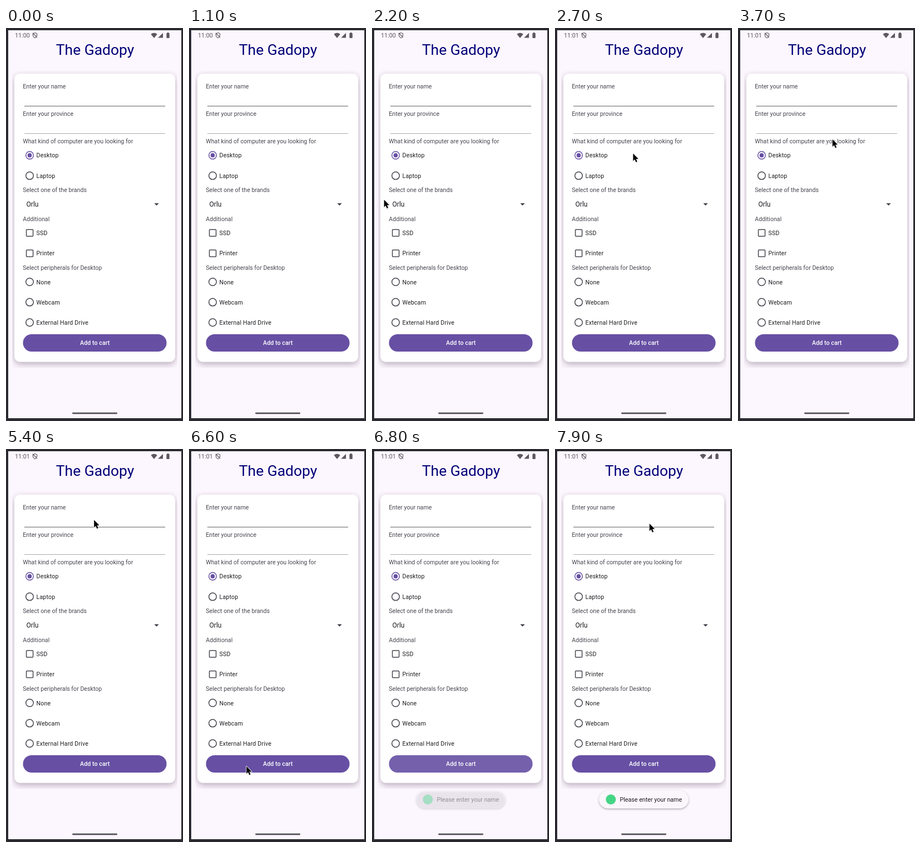
Write an HTML page with a canvas that moves like this. It is 318 px wide and 702 px high and loops after 8000 ms.

```html
<!DOCTYPE html>
<html lang="en">
<head>
<meta charset="utf-8">
<title>Computer order form</title>
<style>
html, body { margin: 0; width: 100%; height: 100%; overflow: hidden; background: #2b2a30; }
canvas { display: block; width: 318px; height: 702px; }
</style>
</head>
<body>
<canvas id="stage"></canvas>
<script>
const W = 318, H = 702, LOOP = 8000, STEP = 100;
const PAGE = '#fcf6fe', INK = '#1d1b20', LABEL = '#49454f', PURPLE = '#6750a4';
const canvas = document.getElementById('stage');
const ctx = canvas.getContext('2d');
const dpr = window.devicePixelRatio || 1;
canvas.width = W * dpr;
canvas.height = H * dpr;

// Pointer strokes: each is a run of [ms, x, y].
const strokes = [
  [[1600, 21, 306], [2200, 21, 306], [2900, 169, 203], [3200, 169, 203],
   [3400, 169, 198], [4300, 169, 198], [4600, 168, 161], [4700, 168, 161],
   [5100, 161, 118], [5400, 157.5, 126], [5700, 157.5, 126],
   [6300, 100, 560], [6400, 102.5, 566], [6600, 102.5, 566], [6700, 272, 257]],
  [[7600, 291, 251], [7900, 169, 132.5]]
];

const clamp = v => Math.min(1, Math.max(0, v));
const ease = v => v * v * (3 - 2 * v);

function pointerAt(t) {
  const run = strokes.find(s => t >= s[0][0] && t < s[s.length - 1][0] + STEP);
  if (!run) return null;
  let i = 0;
  while (i < run.length - 2 && t >= run[i + 1][0]) i++;
  const [t0, x0, y0] = run[i], [t1, x1, y1] = run[i + 1];
  const k = ease(clamp((t - t0) / (t1 - t0)));
  return [x0 + (x1 - x0) * k, y0 + (y1 - y0) * k];
}

function text(str, x, y, { size = 10.6, color = INK, weight = 400, gap = 0, align = 'left' } = {}) {
  ctx.font = `${weight} ${size}px Roboto, sans-serif`;
  ctx.letterSpacing = gap + 'px';
  ctx.textAlign = align;
  ctx.fillStyle = color;
  ctx.fillText(str, x, y);
}

function box(x, y, w, h, r, color) {
  ctx.beginPath();
  ctx.roundRect(x, y, w, h, r);
  ctx.fillStyle = color;
  ctx.fill();
}

function poly(points, color) {
  ctx.beginPath();
  points.forEach(([x, y]) => ctx.lineTo(x, y));
  ctx.closePath();
  ctx.fillStyle = color;
  ctx.fill();
}

function disc(x, y, r, color) {
  ctx.beginPath();
  ctx.arc(x, y, r, 0, Math.PI * 2);
  ctx.fillStyle = color;
  ctx.fill();
}

function shadow(color, blur, dy) {
  ctx.shadowColor = color;
  ctx.shadowBlur = blur * dpr;
  ctx.shadowOffsetY = dy * dpr;
}

function radio(label, y, on) {
  ctx.beginPath();
  ctx.arc(42.5, y, 6.8, 0, Math.PI * 2);
  ctx.strokeStyle = on ? PURPLE : LABEL;
  ctx.lineWidth = 1.5;
  ctx.stroke();
  if (on) disc(42.5, y, 3.8, PURPLE);
  text(label, 54.5, y + 4, { gap: 0.19 });
}

function checkbox(label, y) {
  ctx.beginPath();
  ctx.roundRect(36.6, y - 6, 12, 12, 1);
  ctx.strokeStyle = LABEL;
  ctx.lineWidth = 1.5;
  ctx.stroke();
  text(label, 54.5, y + 4, { gap: 0.19 });
}

function statusBar(t) {
  const grey = '#5b585f';
  text(t < 2500 ? '11:00' : '11:01', 16, 17, { size: 10.8, color: grey });

  ctx.strokeStyle = grey;
  ctx.lineWidth = 1.1;
  ctx.beginPath();
  ctx.moveTo(52, 8.5);
  ctx.lineTo(55.6, 10);
  ctx.lineTo(55.6, 13);
  ctx.quadraticCurveTo(55.2, 16.3, 52, 17.7);
  ctx.quadraticCurveTo(48.8, 16.3, 48.4, 13);
  ctx.lineTo(48.4, 10);
  ctx.closePath();
  ctx.moveTo(48, 9);
  ctx.lineTo(56, 17);
  ctx.stroke();

  ctx.beginPath();
  ctx.moveTo(266, 18);
  ctx.lineTo(260.3, 11);
  ctx.quadraticCurveTo(266, 6.4, 271.7, 11);
  ctx.closePath();
  ctx.fillStyle = grey;
  ctx.fill();
  poly([[273.2, 17.5], [282, 17.5], [282, 8.7]], grey);
  box(288.3, 9, 5.4, 9, 1, grey);
  box(289.8, 8, 2.4, 2, 0, grey);
}

function card() {
  ctx.save();
  ctx.beginPath();
  ctx.rect(11, 76, 297, 531);
  ctx.clip();
  shadow('rgba(60,35,60,.34)', 12, 4);
  box(15, 81.5, 289, 515, 10, '#fff');
  ctx.restore();
}

function button(t) {
  ctx.save();
  box(30.5, 547, 258, 31, 15.5, PURPLE);
  if (t >= 6700 && t < 7200) {
    ctx.clip();
    const grow = clamp((t - 6600) / 200);
    const fade = 1 - clamp((t - 6800) / 400);
    disc(102.5 + 57 * grow, 563, 150 * grow, `rgba(255,255,255,${0.09 * fade})`);
  }
  ctx.restore();
  text('Add to cart', 159.7, 566.4, { color: '#fff', weight: 500, gap: 0.08, align: 'center' });
}

function toast(t) {
  const alpha = clamp((t - 6700) / 240);
  if (!alpha) return;
  ctx.save();
  ctx.globalAlpha = alpha;
  ctx.save();
  shadow('rgba(40,30,50,.36)', 3.5, 1.5);
  box(79, 610, 161, 32, 16, '#fbf6fc');
  ctx.restore();
  disc(100.3, 626, 9, '#45d586');
  text('Please enter your name', 116.5, 630, { size: 10.7 });
  ctx.restore();
}

function pointer(t) {
  const p = pointerAt(t);
  if (!p) return;
  ctx.save();
  ctx.translate(p[0] + 0.7, p[1] + 0.8);
  const arrow = [[0, 0], [0, 13.2], [3, 10.5], [5.1, 15.5], [7.4, 14.5], [5.3, 9.7], [9.4, 9.5]];
  shadow('rgba(0,0,0,.3)', 2, 1);
  poly(arrow, '#fff');
  ctx.shadowColor = 'transparent';
  ctx.strokeStyle = '#fff';
  ctx.lineWidth = 1.7;
  ctx.lineJoin = 'round';
  ctx.stroke();
  poly(arrow, '#000');
  ctx.restore();
}

function draw(t) {
  ctx.setTransform(dpr, 0, 0, dpr, 0, 0);
  box(0, 0, W, H, 0, '#2b2a30');
  box(4, 4, 311, 693, 0, PAGE);
  statusBar(t);
  text('The Gadopy', 160, 47.6, { size: 26.4, color: '#000077', align: 'center' });
  card();

  const label = (str, y) => text(str, 30.3, y, { color: LABEL, size: 10.65 });
  label('Enter your name', 108.3);
  box(33, 139, 253, 1, 0, '#626066');
  label('Enter your province', 157);
  box(33, 188, 253, 1, 0, '#aaa8ad');
  label('What kind of computer are you looking for', 205.8);
  radio('Desktop', 227.4, true);
  radio('Laptop', 263.8);
  label('Select one of the brands', 293.3);
  text('Orlu', 36.5, 319.3, { size: 12.1 });
  poly([[266.3, 313], [274.7, 313], [270.5, 317.3]], LABEL);
  label('Additional', 344.6);
  checkbox('SSD', 366);
  checkbox('Printer', 402.4);
  label('Select peripherals for Desktop', 432);
  radio('None', 453.5);
  radio('Webcam', 489.8);
  radio('External Hard Drive', 526);

  button(t);
  toast(t);
  box(119, 686.8, 81, 2.6, 1.3, '#545158');
  pointer(t);
}

const start = performance.now();
function tick() {
  const t = (performance.now() - start) % LOOP;
  draw(Math.floor(t / STEP) * STEP);
  requestAnimationFrame(tick);
}
tick();
</script>
</body>
</html>
```
